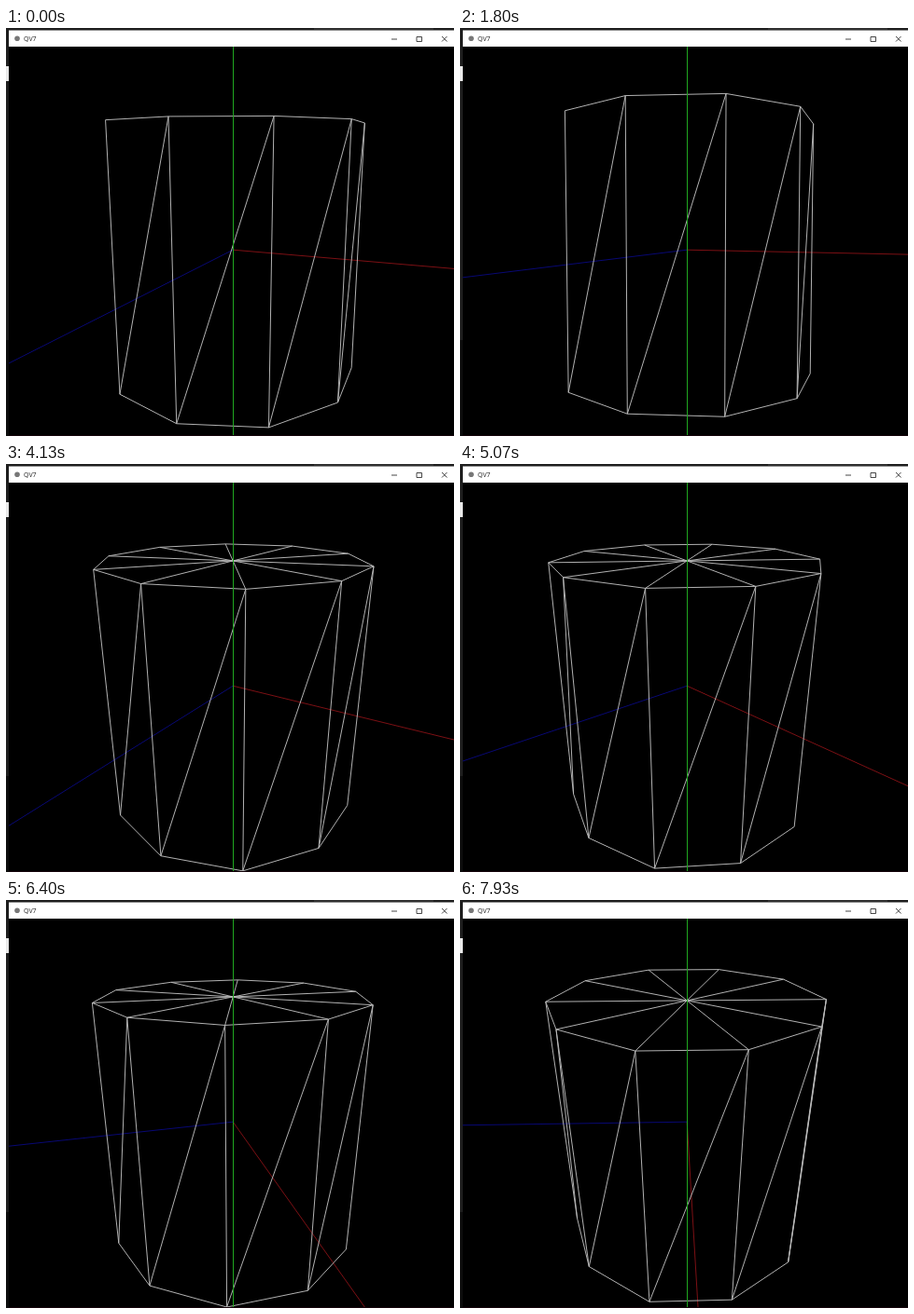
Animation of 480 by 438 pixels, one loop 8000 ms. Source, as an HTML page:

```html
<!DOCTYPE html>
<html lang="en">
<head>
<meta charset="utf-8">
<title>Wireframe cylinder</title>
<style>
  html, body { margin: 0; width: 100%; height: 100%; overflow: hidden; background: #000; }
  svg { display: block; width: 480px; height: 438px; }
  .wire { fill: none; stroke: #bcbcbc; stroke-width: .95; }
  .glyph { fill: none; stroke: #333; stroke-width: .9; }
  text { font: 7px "Open Sans", "Noto Sans", sans-serif; fill: #222; }
</style>
</head>
<body>
<svg viewBox="0 0 480 438">
  <rect width="480" height="438" fill="#000"/>
  <path id="xAxis" stroke="#7c1014"/>
  <path id="zAxis" stroke="#080874"/>
  <path id="mesh" class="wire"/>
  <path d="M243.5 20V438" stroke="#20a820"/>

  <!-- window frame -->
  <rect y="437" width="480" height="1" fill="#14030a"/>
  <rect width="3" height="438" fill="#1e1e1e"/>
  <rect y="335" width="3" height="103" fill="#0c0c0c"/>
  <rect y="41" width="3" height="16" fill="#e8e8e8"/>
  <rect width="480" height="3" fill="#1e1e1e"/>
  <rect x="330" width="128" height="2" fill="#303030"/>
  <rect x="3" y="2.5" width="477" height="17.5" fill="#fff"/>
  <circle cx="12" cy="11.3" r="2.8" fill="#777"/>
  <text x="19" y="14">QV7</text>
  <path class="glyph" d="M413 12H419M440 9.5H445.5V14.5H440ZM467 9L472.5 14.5M472.5 9L467 14.5"/>
</svg>
<script>
const LOOP = 8000, STEP = 1000 / 15;
const CX = 243.2, CY = 238.2, FOCAL = 526.4, DIST = 4, SIDES = 10;
const RAD = Math.PI / 180, SLICE = 2 * Math.PI / SIDES;

// [ms, degrees]
const PITCH = [[0, 12], [667, 2], [1000, 2], [1267, -1], [1600, -1], [1800, 2.9], [1933, 6],
  [2000, 6], [2733, 21.3], [2867, 22.2], [3400, 23], [7333, 23], [7933, 30]];
const YAW = [[0, 22.3], [3667, 22.3], [4133, 32], [5067, 49.3], [6400, 74.5], [7133, 88.3]];

const $ = id => document.getElementById(id);
const pt = p => p[0].toFixed(2) + ' ' + p[1].toFixed(2);
const line = (a, b) => 'M' + pt(a) + 'L' + pt(b);

function track(keys, t) {
  for (let i = 1; i < keys.length; i++) {
    const [t0, a] = keys[i - 1], [t1, b] = keys[i];
    if (t < t1) return a + (b - a) * (t - t0) / (t1 - t0);
  }
  return keys[keys.length - 1][1];
}

function render(ms) {
  const t = Math.floor(ms / STEP + 0.1) * STEP;
  const pitch = track(PITCH, t) * RAD, yaw = track(YAW, t) * RAD;
  const c = Math.cos(pitch), s = Math.sin(pitch);

  // x to the right, y up, z towards the viewer
  const project = (x, y, z) => {
    const k = FOCAL / (DIST - z * c - y * s);
    return [CX + x * k, CY - (y * c - z * s) * k];
  };
  const ray = a => line([CX, CY], [CX + 900 * Math.cos(a), CY + 900 * Math.sin(a) * s]);
  $('xAxis').setAttribute('d', ray(yaw));
  $('zAxis').setAttribute('d', ray(yaw + Math.PI / 2));

  const angle = k => yaw + SLICE * (k + 0.5);
  const ring = y => Array.from({ length: SIDES },
    (_, k) => project(Math.cos(angle(k)), y, Math.sin(angle(k))));
  const top = ring(1), low = ring(-1), hub = project(0, 1, 0);
  const capSeen = DIST * s > 1;

  // a set, so that shared edges are drawn once
  const edges = new Set();
  for (let k = 0; k < SIDES; k++) {
    const n = (k + 1) % SIDES;
    const sideSeen = DIST * c * Math.sin(angle(k + 0.5)) > Math.cos(SLICE / 2);
    if (capSeen) edges.add(line(hub, top[k]));
    if (capSeen || sideSeen) edges.add(line(top[k], top[n]));
    if (sideSeen) {
      edges.add(line(top[k], low[k])).add(line(top[n], low[n]))
        .add(line(low[k], low[n])).add(line(top[k], low[n]));
    }
  }
  $('mesh').setAttribute('d', [...edges].join(''));
}

const start = performance.now();
function tick() {
  render((performance.now() - start) % LOOP);
  requestAnimationFrame(tick);
}
tick();
</script>
</body>
</html>
```
